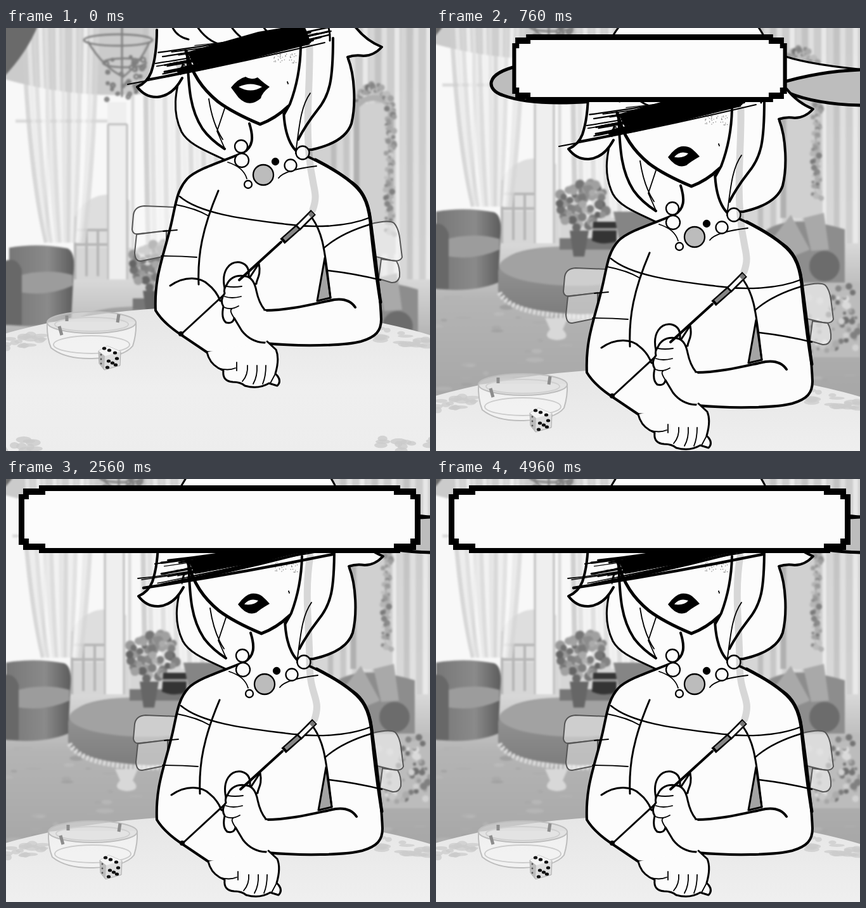
Recreate the animation shown at these times as an HTML page. Size 669x668 px, loop 5 s.

```html
<!DOCTYPE html>
<html lang="en">
<head>
<meta charset="utf-8">
<title>At the table</title>
<style>
html, body { margin: 0; width: 100%; height: 100%; overflow: hidden; background: #ccc; }
svg { display: block; width: 669px; height: 668px; }
#room { filter: blur(1.6px); }
.ink { fill: none; stroke: #000; stroke-width: 3; stroke-linecap: round; stroke-linejoin: round; }
.w { fill: #fcfcfc; }
.b { stroke-width: 5; }
.m { stroke-width: 4; }
.t { stroke-width: 1.8; }
.veil { fill: #fcfcfc; fill-opacity: .5; stroke: #555; stroke-width: 2; }
</style>
</head>
<body>
<svg viewBox="0 0 669 668">
  <defs>
    <linearGradient id="floorG" x2="0" y2="1"><stop stop-color="#d8d8d8"/><stop offset=".25" stop-color="#b4b4b4"/><stop offset="1" stop-color="#9c9c9c"/></linearGradient>
    <linearGradient id="chairG"><stop stop-color="#777"/><stop offset=".6" stop-color="#8a8a8a"/><stop offset="1" stop-color="#5c5c5c"/></linearGradient>
    <linearGradient id="puffG" x2="0" y2="1"><stop stop-color="#9a9a9a"/><stop offset="1" stop-color="#7d7d7d"/></linearGradient>
    <linearGradient id="wallG" x2="0" y2="1"><stop stop-color="#c9c9c9"/><stop offset="1" stop-color="#e4e4e4"/></linearGradient>
    <linearGradient id="tableG" x2="0" y2="1"><stop stop-color="#e6e6e6"/><stop offset=".3" stop-color="#efefef"/><stop offset="1" stop-color="#e9e9e9"/></linearGradient>
  </defs>

  <g id="room">
    <rect x="-20" y="-80" width="720" height="780" fill="url(#wallG)"/>
    <path d="M-20 20H335V345H-20Z" fill="#f8f8f8"/>
    <path d="M105 235Q140 190 190 215V290H105Z" fill="#dedede"/>
    <path d="M105 290H330V345H105Z" fill="#d6d6d6"/>
    <path d="M104 240V340M104 262H160M104 285H160M122 262V335M140 262V335" stroke="#b5b5b5" stroke-width="4"/>
    <path d="M10 90H160M60 20V280M195 30V330" stroke="#dadada" stroke-width="5"/>
    <path d="M155 60H185V345H155Z" fill="#efefef"/>
    <path d="M156 95V345M186 95V345M156 95H186" fill="none" stroke="#bdbdbd" stroke-width="3"/>
    <path d="M-20 -80H330V25Q160 75 -20 20Z" fill="#cbcbcb"/>
    <g id="drapes"></g>
    <path d="M-20 -80H52Q34 -20 -20 32Z" fill="#6a6a6a"/>
    <g id="lamp" fill="none" stroke="#808080" stroke-width="3">
      <ellipse cx="172" cy="-38" rx="54" ry="9"/><ellipse cx="182" cy="-2" rx="34" ry="7"/>
      <path d="M178 -80V52M124 -36Q148 5 180 20Q206 0 222 -36"/>
    </g>
    <path d="M-20 340H700V700H-20Z" fill="url(#floorG)"/>
    <g id="carpet"></g>
    <path d="M545 62H610V300H545Z" fill="#d0d0d0"/>
    <path d="M548 300V66Q575 40 602 66V270" fill="none" stroke="#b0b0b0" stroke-width="9"/>
    <g id="carving"></g>
    <path d="M0 290Q45 282 92 291Q104 296 102 325L98 402Q60 418 0 412Z" fill="url(#chairG)"/>
    <path d="M15 334Q60 322 100 333V350Q60 368 15 360Z" fill="#9c9c9c"/>
    <path d="M-10 312Q12 302 20 325V412H-10Z" fill="#686868"/>
    <g id="near">
      <path d="M98 385Q100 342 230 345Q345 345 345 390V425Q330 450 225 452Q105 445 98 415Z" fill="url(#puffG)"/>
      <ellipse cx="222" cy="376" rx="122" ry="31" fill="#a2a2a2"/>
      <path d="M100 418Q120 453 225 456Q310 456 340 430" fill="none" stroke="#ddd" stroke-width="8" stroke-dasharray="4 3"/>
      <path d="M172 458H208L200 476Q215 492 190 493Q166 490 180 476Z" fill="#d8d8d8"/>
      <path d="M195 332H285V350H195Z" fill="#777"/>
      <path d="M211 320H241L234 361H217Z" fill="#666"/>
      <g id="flowers"></g>
      <path d="M248 306H285V337Q265 344 246 336Z" fill="#343434"/>
      <path d="M247 318H285" stroke="#999" stroke-width="4"/>
      <path d="M280 290H350V340H290Z" fill="#858585"/>
      <path d="M520 320Q560 292 645 318V410H520Z" fill="#8d8d8d"/>
      <path d="M533 330L560 295L590 350L560 362ZM580 300L612 292L620 350L592 352Z" fill="#a9a9a9"/>
      <circle cx="613" cy="376" r="24" fill="#6c6c6c"/>
      <path d="M570 402H669V520H570Z" fill="#bcbcbc"/>
      <g id="shelf"></g>
    </g>
  </g>

  <g id="scene">
    <ellipse cx="332" cy="752" rx="560" ry="220" fill="url(#tableG)"/>
    <g id="lace" fill="#cbcbcb"></g>
    <g fill="none" stroke="#bdbdbd" stroke-width="2">
      <path d="M67 556Q66 580 73 597Q95 615 138 614Q188 612 202 594Q208 575 207 556" fill="#fff" fill-opacity=".35"/>
      <ellipse cx="137" cy="557" rx="70" ry="17" fill="#dadada" fill-opacity=".6"/>
      <ellipse cx="137" cy="560" rx="58" ry="11" stroke="#cfcfcf"/>
      <ellipse cx="137" cy="592" rx="60" ry="14" stroke="#ccc"/>
      <path d="M86 563L90 577M180 544L178 557M98 546V555" stroke="#8d8d8d" stroke-width="5"/>
    </g>
    <path d="M148 602L162 594L183 603L182 625L157 632L149 622Z" fill="#dedede" stroke="#aaa"/>
    <path d="M148 602L162 594L183 603L158 610Z" fill="#f4f4f4"/>
    <path d="M148 602L158 610L157 632L149 622Z" fill="#bcbcbc"/>
    <g id="pips"></g>

    <g id="hat" class="ink">
      <path class="w" d="M258 60C275 5 290 -40 400 -70C510 -40 515 0 540 60Z"/>
      <path class="w" d="M540 35Q585 53 700 62V85H540Z"/>
      <path class="b" fill="#bdbdbd" d="M130 54C75 66 80 92 105 100Q150 117 245 110L555 96Q610 119 710 116V60Q620 57 540 82L245 80Z"/>
    </g>

    <g class="veil">
      <path d="M270 375L220 373Q205 374 203 387L201 410Q202 419 212 417L270 411Z"/>
      <path d="M208 418L205 447Q206 461 215 460L255 452V412Z"/>
      <path d="M575 402Q606 394 614 400Q622 408 624 430L627 454Q624 462 610 459L585 453Z"/>
      <path d="M594 457L618 460Q624 470 623 485Q620 495 610 494L590 488Z"/>
    </g>

    <g class="ink">
      <path class="w" d="M281 150C268 195 264 225 279 256C292 280 330 290 358 306L400 280V150Z"/>
      <path class="w m" d="M516 90L541 138C553 168 554 215 547 243C539 267 512 278 485 284L440 285V110Z"/>
      <path class="w" d="M386 243C393 265 392 280 376 289C340 304 302 315 288 330C268 352 270 378 258 420C247 462 236 490 238 538Q250 558 279 577L319 604L380 610L412 590C465 595 535 594 562 587C586 580 594 570 594 552C592 500 583 440 577 392C573 362 562 345 547 335C525 318 500 305 478 295C455 292 441 265 440 220" stroke-width="4"/>
      <path class="b" d="M490 300C525 318 556 338 566 358Q574 372 577 398M577 400Q584 470 593 525"/>
      <path d="M505 455L493 523L514 518Z" fill="#a4a4a4"/>
      <path d="M485 392C501 415 504 440 509 477L514 518M337 349C312 408 304 450 306 497M261 499C285 482 310 486 321 497Q334 507 340 523"/>
      <path class="m" d="M410 538C450 538 490 527 520 521Q543 518 553 533"/>
      <path d="M276 358C312 389 400 396 445 402S540 406 577 391M503 440Q530 416 577 402M510 475Q553 480 593 490" style="stroke-width:2.4"/>
      <path class="t" d="M270 371Q302 377 322 389M250 413L272 411M247 452Q275 452 303 454M352 304Q377 312 382 330M432 329Q441 316 492 310"/>
    </g>

    <g class="ink">
      <path class="w" d="M319 604Q323 621 337 629L345 633Q343 650 360 651Q372 651 379 657Q400 663 417 653L430 657Q437 650 430 641L427 638Q434 614 428 600L414 587"/>
      <path class="t" d="M337 629Q352 634 364 629M366 620V633M383 625Q384 640 375 650M398 625Q399 642 392 654M412 625Q412 642 407 654M427 638L419 653"/>
      <path class="w" d="M347 503C341 475 355 460 371 462C384 465 387 476 384 490L401 464C405 483 397 489 397 496Z"/>
      <path d="M279 575L436 430"/>
      <path class="w" d="M350 498Q358 480 380 484Q393 486 397 507Q401 526 410 537V589Q388 588 374 570L362 550Q360 560 349 557Q341 550 345 532Q339 522 347 511Q345 504 350 498Z"/>
      <path d="M410 542V584" stroke="#fcfcfc" stroke-width="7"/>
      <path class="t" d="M350 500Q361 502 374 500M347 516Q358 520 373 516M346 533Q357 538 369 531M362 550Q354 538 358 536"/>
      <path d="M370 490L436 430" stroke-width="4"/>
      <path d="M438 429L466 404" stroke-width="11" stroke-linecap="butt"/>
      <path d="M441 426L464 406" stroke="#858585" stroke-width="6" stroke-linecap="butt"/>
      <path d="M462 408L487 383" stroke-width="11" stroke-linecap="butt"/>
      <path d="M464 406L482 388" stroke="#fcfcfc" stroke-width="6" stroke-linecap="butt"/>
      <path d="M481 389L486 384" stroke="#777" stroke-width="7" stroke-linecap="butt"/>
      <circle cx="278" cy="575" r="2.5" fill="#000"/>
    </g>

    <g class="ink">
      <path class="w" stroke="none" d="M240 95Q380 10 556 95L541 138L516 180L463 265L441 225L403 245L347 218L346 283L300 240L285 150L240 130Z"/>
      <path class="w m" d="M240 95Q240 135 231 162Q225 178 209 185Q222 202 241 201Q265 199 280 171"/>
      <path class="w m" d="M553 90Q570 112 595 122Q582 136 566 136Q552 134 541 138"/>
      <path class="m" d="M288 132C290 190 293 222 312 251Q324 268 347 283M518 108C518 175 513 198 493 222Q475 245 463 268"/>
      <path class="b" d="M286 128C295 165 312 188 336 208Q360 226 403 244Q427 235 447 216"/>
      <path class="m" d="M467 122Q466 170 450 212L441 228"/>
      <path class="t" d="M322 204Q328 244 344 268M347 219L335 255L347 282M482 195C467 216 465 245 459 290"/>
      <path d="M262 84Q268 105 290 110M352 82Q362 98 372 106M405 82Q410 102 432 105M300 84Q320 118 352 120M508 84Q514 96 513 112"/>
    </g>
    <g id="lipsOpen">
      <path d="M357 186Q368 172 380 169Q389 175 399 170Q410 180 418 185Q406 194 404 203Q386 219 369 202Z"/>
      <path d="M369 185Q388 176 406 185Q388 196 369 185Z" fill="#fcfcfc"/>
    </g>
    <g id="lipsShut">
      <path d="M366 198Q377 183 387 181Q397 180 404 185Q411 191 416 197Q402 205 395 211Q380 217 366 198Z"/>
      <path d="M376 198Q384 187 398 192Q392 200 376 198Z" fill="#fcfcfc"/>
    </g>
    <path class="ink t" d="M446 177L447 180"/>
    <g id="freckles" fill="#777"></g>
    <g id="beads" class="ink"></g>
    <g class="boil"></g>
    <g class="boil"></g>
  </g>

  <g id="box">
    <path d="M20 24H27V15H52V10H622V15H647V24H654V104H647V112H622V117H52V112H27V104H20Z"/>
    <path d="M29 32H36V25H62V19H612V25H638V32H645V94H638V102H612V109H62V102H36V94H29Z" fill="#fcfcfc"/>
  </g>
</svg>
<script>
const NS = 'http://www.w3.org/2000/svg';
const $ = id => document.getElementById(id);
const add = (parent, tag, attrs) => {
  const el = document.createElementNS(NS, tag);
  for (const k in attrs) el.setAttribute(k, attrs[k]);
  return parent.appendChild(el);
};
const dot = (g, cx, cy, r, fill) => add(g, 'circle', { cx, cy, r, fill });
const random = seed => () => {
  seed = (seed * 16807) % 2147483647;
  return seed / 2147483647;
};
const grey = v => `rgb(${v},${v},${v})`;

function furnish() {
  const rnd = random(71);
  const between = (a, b) => a + (b - a) * rnd();
  const shade = (a, b) => grey(Math.round(between(a, b)));
  const fold = (x, top, bend, bottom, w, v) => add($('drapes'), 'path', {
    d: `M${x} ${top}Q${x + bend * .2} 160 ${x + bend} ${bottom}`,
    fill: 'none', stroke: grey(v), 'stroke-width': w, 'stroke-opacity': .75
  });
  for (let i = 0; i < 14; i++) fold(22 + i * 9, -70, (73 - i * 9) * .5, 282, 7, 205 + (i * 29) % 46);
  for (let i = 0; i < 12; i++) fold(215 + i * 10, -70, 5, 300, 8, 195 + (i * 23) % 48);
  for (let i = 0; i < 18; i++) fold(512 + i * 10, -70, 0, 340, 8, 182 + (i * 37) % 62);

  for (let i = 0; i < 130; i++)
    add($('carpet'), 'ellipse', { cx: between(0, 669), cy: between(415, 580), rx: between(4, 15), ry: between(1, 4), fill: shade(145, 195), opacity: .6 });
  for (let i = 0; i < 75; i++) {
    const a = rnd() * 6.28, r = Math.sqrt(rnd());
    dot($('flowers'), 230 + Math.cos(a) * r * 40, 278 + Math.sin(a) * r * 38, between(4, 8), shade(95, 185));
  }
  for (let i = 0; i < 70; i++) dot($('carving'), 601 + between(-7, 7), 48 + i * 3.2, between(2, 5), shade(115, 215));
  for (let i = 0; i < 36; i++) dot($('carving'), 546 + i * 1.6, 60 - Math.sin(i / 11.5) * 22 + between(-7, 7), between(2, 6), shade(115, 205));
  for (let i = 0; i < 60; i++) dot($('shelf'), between(582, 669), between(408, 512), between(2, 6), shade(110, 225));
  for (let i = 0; i < 32; i++) dot($('lamp'), between(150, 214), between(-12, 56), between(1.5, 3.5), shade(115, 215));

  for (let i = 0; i < 40; i++) {
    const x = i % 2 ? between(590, 669) : between(0, 68);
    const y = 752 - 220 * Math.sqrt(1 - ((x - 332) / 560) ** 2) + between(9, 28);
    add($('lace'), 'ellipse', { cx: x, cy: y, rx: between(5, 14), ry: between(2, 5), opacity: .75 });
  }
  for (let i = 0; i < 24; i++)
    add($('lace'), 'ellipse', { cx: i % 2 ? between(590, 680) : between(-10, 50), cy: between(738, 765), rx: between(6, 14), ry: between(3, 6), opacity: .8 });
}

function details() {
  for (const [x, y] of [[157, 598], [165, 601], [174, 605], [164, 618], [177, 614], [162, 628], [175, 624], [170, 621]])
    add($('pips'), 'ellipse', { cx: x, cy: y, rx: 3.2, ry: 2.5, fill: '#111' });
  for (const y of [608, 615, 622]) dot($('pips'), 152, y, 1.4, '#555');
  for (const [x, y, r, fill] of [[373, 279, 10, '#fcfcfc'], [374, 301, 11, '#fcfcfc'], [384, 339, 6, '#fcfcfc'],
    [408, 324, 16, '#bcbcbc'], [427, 303, 5, '#000'], [451, 309, 9.5, '#fcfcfc'], [470, 289, 10.5, '#fcfcfc']])
    dot($('beads'), x, y, r, fill).style.strokeWidth = 2.3;
  const rnd = random(19);
  for (let i = 0; i < 42; i++) dot($('freckles'), 425 + rnd() * 35, 132 + rnd() * 16, .7);
}

// Scribble strokes run along a rising axis; each pose has its own seed and stray lines.
function scribble(g, seed, strays, smoke) {
  const rnd = random(seed);
  const line = (x1, y1, x2, y2, w) => add(g, 'path', {
    d: `M${x1} ${y1}Q${(x1 + x2) / 2} ${(y1 + y2) / 2 + 4} ${x2} ${y2}`, class: 'ink', style: `stroke-width:${w}`
  });
  add(g, 'path', { d: smoke, fill: 'none', stroke: '#000', 'stroke-opacity': .15, 'stroke-width': 11, 'stroke-linecap': 'round' });
  add(g, 'path', { d: 'M288 130L400 98L472 86L482 112L390 132L298 150Z' });
  for (let i = 0; i < 26; i++) {
    const off = (rnd() - .5) * 42;
    const x1 = 238 + rnd() * 70, x2 = 410 + rnd() * 105;
    line(x1, 148 + off - (x1 - 260) * .2, x2, 147 + off * .6 - (x2 - 260) * .2, 1 + rnd() * 2.6);
  }
  for (const s of strays) line(...s);
}

furnish();
details();
const poses = document.querySelectorAll('.boil');
scribble(poses[0], 411, [[194, 181, 505, 115, 2], [225, 173, 480, 117, 2.5], [238, 148, 515, 97, 2]],
  'M481 122C482 180 475 230 480 290S496 350 486 379');
scribble(poses[1], 937, [[217, 172, 515, 119, 4.5], [208, 157, 330, 138, 1.8], [214, 159, 560, 103, 1.6], [235, 134, 470, 92, 2]],
  'M480 122C470 180 479 235 479 290S498 345 487 379');

// Eases in and out between [time, value] keys.
const tween = (t, keys) => {
  const i = keys.findIndex(k => k[0] > t);
  if (i === 0) return keys[0][1];
  if (i < 0) return keys[keys.length - 1][1];
  const [t0, a] = keys[i - 1], [t1, b] = keys[i];
  const p = (t - t0) / (t1 - t0);
  return a + (b - a) * p * p * (3 - 2 * p);
};
const panX = [[520, -2], [600, 0]];
const panY = [[520, -92], [600, -94], [760, 6], [920, 0]];
const roomPan = [[600, 1], [760, 0]];
const hatDrop = [[520, -60], [600, 0]];
const boxGrow = [[640, 0], [832, 1]];

const move = (id, x, y) => $(id).setAttribute('transform', `translate(${x} ${y})`);
const show = (id, on) => $(id).style.display = on ? '' : 'none';

function draw(now) {
  const t = Math.floor(now % 5000 / 40) * 40;
  const pan = tween(t, roomPan);
  move('room', 5 * pan, 57 * pan);
  move('near', 0, 38 * pan);
  move('scene', tween(t, panX), tween(t, panY));
  move('hat', 0, tween(t, hatDrop));
  show('lipsOpen', t < 560);
  show('lipsShut', t >= 560);

  const grow = tween(t, boxGrow);
  show('box', grow > 0);
  $('box').setAttribute('transform', `translate(${337 * (1 - grow)} 0) scale(${grow} 1)`);

  // Two poses alternate every 200 ms, with one blended step between.
  const beat = t + 40, pose = Math.floor(beat / 200) % 2;
  const mixed = beat >= 160 && beat % 200 >= 160;
  poses.forEach((g, i) => g.setAttribute('opacity', mixed ? .6 : i === pose ? 1 : 0));
}
const start = performance.now();
const loop = () => {
  draw(performance.now() - start);
  requestAnimationFrame(loop);
};
loop();
</script>
</body>
</html>
```
